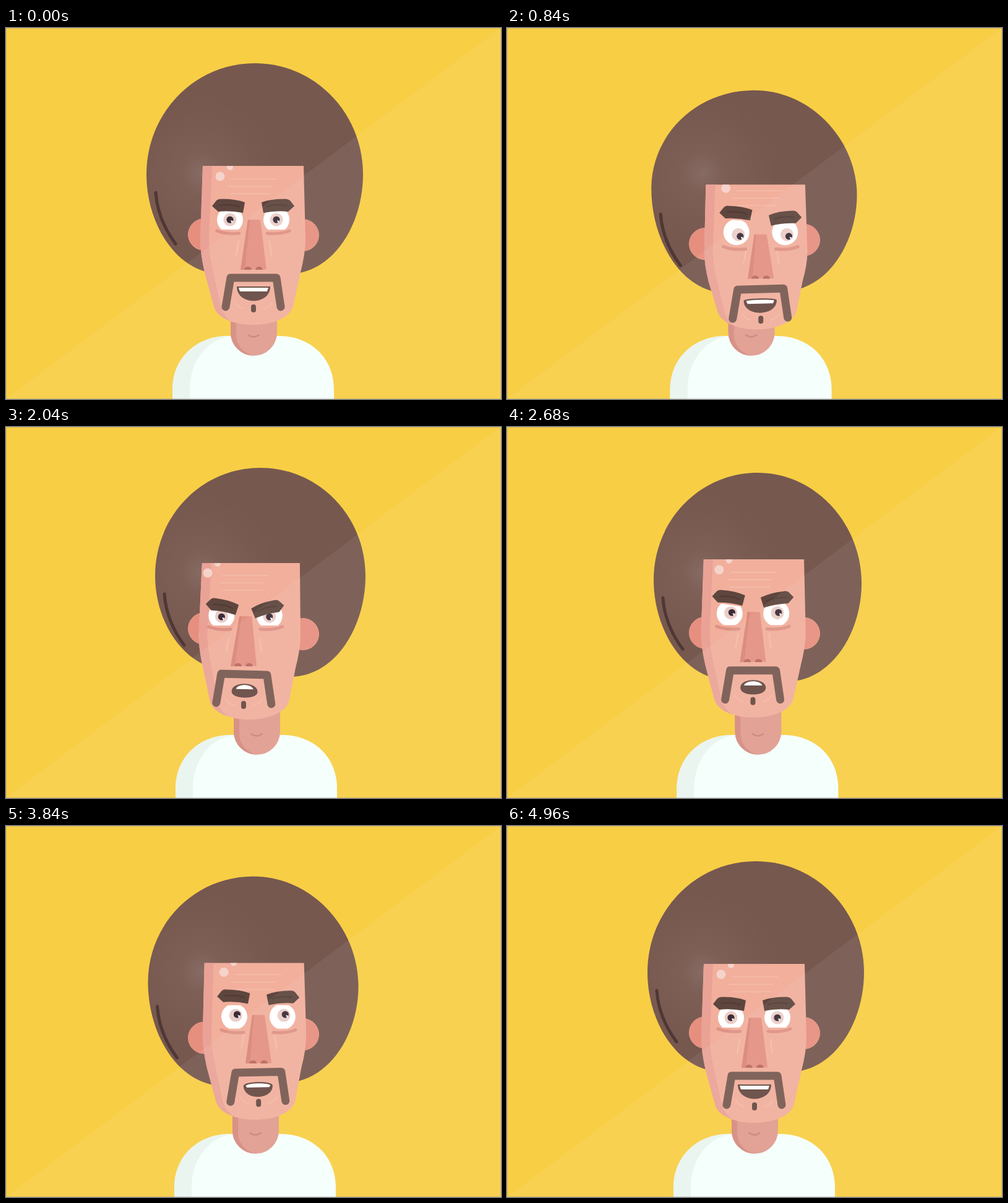
Recreate the animation shown at these times as an HTML page. Size 800 px wide and 600 px high, loop 5000 ms.

```html
<!DOCTYPE html>
<html lang="en">
<head>
<meta charset="utf-8">
<title>Talking head</title>
<style>
html, body { margin: 0; width: 100%; height: 100%; overflow: hidden; background: #f8ce45; }
svg { display: block; width: 100vw; height: 100vh; }
</style>
</head>
<body>
<svg viewBox="0 0 800 600" xmlns="http://www.w3.org/2000/svg">
  <defs>
    <radialGradient id="glow" gradientUnits="userSpaceOnUse" cx="316" cy="235" r="120">
      <stop offset="0" stop-color="#fff" stop-opacity=".12"/>
      <stop offset=".3" stop-color="#f0c8c0" stop-opacity=".06"/>
      <stop offset="1" stop-color="#f0c8c0" stop-opacity="0"/>
    </radialGradient>
  </defs>
  <rect width="800" height="600" fill="#f8ce45"/>
  <g id="man"></g>
  <path d="M0 600L800 0V600Z" fill="#fff" opacity=".06"/>
  <rect x=".5" y=".5" width="799" height="599" fill="none" stroke="#8a8a8a" opacity=".3"/>
</svg>
<script>
const LOOP = 5000;
const man = document.getElementById('man');

// d: sideways turn of the face; l*: eyelids; m*: mouth; t*: teeth; h*: hair
const front = {
  d: 0, top: 223, chin: 480, eye: 310, lt: -14, ls: 0, lb: 16, px: 0, py: 0,
  brow: 288, browR: 288, rot: 0, nose: 310, tip: 391, lip: 404, tilt: 0,
  mouth: 418, mw: 27, mu: 0, md: 31, tb: 8, th: 6, tc: 0, tw: 24,
  earL: 334, earR: 335, hx: 227, hw: 350, hTop: 57, hMid: 237, hDip: 0,
  hBot: 398, hTilt: 0, spot: 240, body: 0
};
const right = {
  ...front, d: 18, top: 260, chin: 490, eye: 335, lt: -23, lb: 23, px: 8, py: 8,
  brow: 300, browR: 309, nose: 339, tip: 409, lip: 426.5, tilt: -3, mouth: 442,
  earL: 355, earR: 344, hx: 231, hw: 330, hTop: 110, hMid: 265, hDip: 13,
  hBot: 435, hTilt: -6, spot: 264, body: -9
};
const left = {
  ...front, d: -16, top: 230, chin: 479, eye: 314, lt: -8, ls: 6, py: 2,
  brow: 298, browR: 303, rot: 8, nose: 316, tip: 394, lip: 408, tilt: 2,
  mouth: 436, mw: 25.5, mu: 19, md: 12, tb: -5, th: 0, tc: 9, tw: 18,
  earL: 329, earR: 339, hx: 241, hw: 340, hTop: 70, hMid: 242,
  hBot: 402, hTilt: 10, spot: 243, body: 7
};
const leftUp = {
  ...left, top: 220, chin: 473, eye: 305, brow: 290, browR: 294, nose: 306,
  tip: 387, lip: 400, mouth: 428, mw: 21, mu: 17, md: 13, tb: -4, tw: 14,
  earL: 326, earR: 335, hTop: 66, hMid: 241, hBot: 399, spot: 236, body: 5
};
const rightUp = {
  ...right, top: 205, chin: 465, eye: 296.5, px: 9, py: -7, brow: 255, browR: 255,
  nose: 289, tip: 370, lip: 384.5, mouth: 412, mw: 20, mu: 16, md: 17,
  tb: -3, th: 0, tc: 9, tw: 16, earL: 343, earR: 332,
  hTop: 86, hMid: 257, hBot: 428, hTilt: -9, spot: 223, body: 6
};
const nod = {
  ...front, d: -1.5, top: 238, chin: 485, eye: 320, brow: 297, browR: 301, rot: 2,
  nose: 322, tip: 398, lip: 412, mouth: 428, earL: 342, earR: 342,
  hx: 228, hTop: 77, hMid: 249, hBot: 408, spot: 250
};

// each move: start, end, pose reached
const moves = [
  [40, 560, right], [680, 1200, left], [1280, 2000, leftUp],
  [2440, 3000, rightUp], [3520, 4160, nod], [4240, 4720, front]
];

const ease = k => k * k * (3 - 2 * k);

function poseAt(t) {
  let from = front;
  for (const [a, b, to] of moves) {
    if (t <= a) return from;
    if (t < b) {
      const k = ease((t - a) / (b - a)), mix = {};
      for (const n in to) mix[n] = from[n] + (to[n] - from[n]) * k;
      return mix;
    }
    from = to;
  }
  return from;
}

const fill = (d, c, more = '') => `<path d="${d}" fill="${c}" ${more}/>`;
const line = (d, c, w, more = '') =>
  `<path d="${d}" fill="none" stroke="${c}" stroke-width="${w}" stroke-linecap="round" stroke-linejoin="round" ${more}/>`;
const dot = (x, y, r, c, more = '') => `<circle cx="${x}" cy="${y}" r="${r}" fill="${c}" ${more}/>`;
const clip = (id, d) => `<clipPath id="${id}"><path d="${d}"/></clipPath>`;

function hair(p) {
  const l = p.hx, r = l + p.hw, c = (l + r) / 2, k = p.hw * .28;
  const ml = p.hMid, mr = ml + p.hDip, v = (ml - p.hTop) * .55;
  const bl = p.hBot - p.hTilt / 2, br = p.hBot + p.hTilt / 2;
  const d = `M${c} ${p.hTop}C${c + k} ${p.hTop} ${r} ${mr - v} ${r} ${mr}
    C${r} ${mr + (br - mr) * .49} ${r - 47} ${br} ${r - 122} ${br}L${l + 123} ${bl}
    C${l + 48} ${bl} ${l} ${ml + (bl - ml) * .49} ${l} ${ml}
    C${l} ${ml - v} ${c - k} ${p.hTop} ${c} ${p.hTop}Z`;
  const y = ml + 29 + Math.max(0, p.d) * 1.2;
  return fill(d, '#76584f') + fill(d, 'url(#glow)') +
    line(`M${l + 15} ${y}q3 44 32 83`, '#4f3735', 5);
}

function body(p) {
  const shirt = 'M269 601V585C269 535 306 498 360 498H440C494 498 530 535 530 585V601Z';
  const neck = 'M363 420H438V492.500A37.500 37.500 0 0 1 363 492.500Z';
  return `<g transform="translate(${p.body})">` +
    fill(shirt, '#f4fffb') +
    fill('M269 601V585C269 535 306 498 360 498C322 506 297 542 297 585V601Z', '#e9f4ef') +
    fill(neck, '#e09c8f') +
    fill('M363 420H372V495C372 512 382 525 400 530A37.500 37.500 0 0 1 363 492.500Z', '#d58b81') +
    line('M391.500 496.500q8.500 6 17 0', '#ca847a', 2.5) + '</g>';
}

function eye(p, x, side) {
  const id = side > 0 ? 'lidL' : 'lidR', s = p.ls * side;
  const ix = p.px * .5, iy = p.py * .6;
  return `<g transform="translate(${x} ${p.eye})">` +
    clip(id, `M-24 ${p.lt - s}L24 ${p.lt + s}V${p.lb - 4}Q20 ${p.lb} 14 ${p.lb}H-14Q-20 ${p.lb} -24 ${p.lb - 4}Z`) +
    line(`M${-21 * side} ${p.lb + 2}q${15 * side} 6 ${36 * side} 4`, '#de9185', 5) +
    `<g clip-path="url(#${id})">` + dot(0, 0, 21, '#fff') +
    dot(ix, iy, 10.5, '#ebcdc8') + dot(p.px, p.py, 5.6, '#3b2d36') +
    fill(`M${p.px + 1} ${p.py + 1}l4 1l-2 4Z`, '#fff') + '</g></g>';
}

function brow(x, y, rot, side) {
  return `<g transform="translate(${x} ${y}) rotate(${rot}) scale(${side} 1)">` +
    fill('M-27 0L-20 -9Q-17 -12 -12 -11.500Q10 -12 26 -6L23 11Q3 7 -17 9Z', '#5e463e') +
    line('M-14 -1Q4 -4 17 1', '#503a34', 2) + '</g>';
}

function mouth(p) {
  const { mw: w, mu: u, md: m, tw, tb, th, tc } = p, y = tb - th;
  return `<g transform="translate(${400 + p.d * .9} ${p.mouth}) rotate(${p.tilt * .7})">` +
    fill(`M${-w} 0C${-w} ${-u} ${w} ${-u} ${w} 0C${w} ${m} ${-w} ${m} ${-w} 0Z`, '#674a43') +
    fill(`M${-tw} ${y}C${-tw * .8} ${y - tc} ${tw * .8} ${y - tc} ${tw} ${y}L${tw - 2} ${tb}H${2 - tw}Z`, '#fff') + '</g>';
}

function head(p) {
  const d = p.d, pick = (a, b) => d * (d > 0 ? a : b);
  const x0 = 318 + pick(.33, .07), x1 = 481 + pick(.08, .38);
  const lx = 314 + pick(.47, .16), rx = 484 + pick(.15, .5);
  const jl = 336 + d * .4, jr = 464 + d * .4, jaw = p.chin - 30, c = 399 + d * .4;
  const h = p.chin - p.top, y1 = p.top + h * .46, y2 = p.top + h * .55, y3 = p.top + h * .67;
  const face = `M${x0} ${p.top}H${x1}L${rx} ${y1}Q${rx} ${y2} ${rx - 8} ${y3}L${jr} ${jaw}
    C${jr - 6} ${jaw + 20} ${jr - 34} ${p.chin} ${c} ${p.chin}
    C${jl + 34} ${p.chin} ${jl + 5} ${jaw + 20} ${jl} ${jaw}
    L${lx + 7} ${y3}Q${lx} ${y2} ${lx} ${y1}Z`;
  const shade = `M${x0 - 9} ${p.top}H${x0 + 15}L${lx + 14} ${y1}Q${lx + 14} ${y2} ${lx + 21} ${y3}
    L${jl + 11} ${jaw}Q${jl + 16} ${jaw + 18} ${jl + 36} ${p.chin}H${lx - 9}Z`;
  const sx = 346 + pick(.75, 1.25), wx = 400 + d * .8, w = p.spot + 4;
  const nx = 400 + d, nt = 401 + d * .85;
  const mx = 400 + d * .95, a = p.lip - p.tilt / 2, b = p.lip + p.tilt / 2;

  return fill(face, '#f1af9c') + clip('face', face) + '<g clip-path="url(#face)">' +
    fill(shade, '#eaa296') +
    dot(sx, p.spot, 7.5, '#f5d3cb') + dot(sx + 16, p.spot - 15, 5, '#f5d3cb') +
    line(`M${wx - 37} ${w}h75M${wx - 42} ${w + 12}h72M${wx - 37} ${w + 24}h64`, '#f6bdac', 1.6) +
    '</g>' +
    line(`M${nx - 24} ${p.tip - 46}l-4 22M${nx + 26} ${p.tip - 46}l3 22`, '#f6bcaa', 2) +
    eye(p, 362 + d * .85, 1) + eye(p, 437 + pick(1.2, .7), -1) +
    brow(360 + pick(1, .65), p.brow, p.rot, 1) +
    brow(439 + d, p.browR, -p.rot * 1.5, -1) +
    fill(`M${nt - 10} ${p.nose}H${nt + 10}L${nx + 21} ${p.tip - .5}H${nx - 21}Z`, '#e39283') +
    fill(`M${nt - 10} ${p.nose}h3L${nx - 14} ${p.tip}h-7Z`, '#d98778') +
    fill(`M${nx - 15} ${p.tip}q1 -5 6 -5t6 5ZM${nx + 3} ${p.tip}q1 -5 6 -5t6 5Z`, '#b9695f') +
    line(`M${mx - 30} ${p.lip + 39}q6 10 14 11M${mx + 16} ${p.lip + 50}q9 -2 14 -10`, '#f5baa8', 1.6) +
    line(`M${mx - 45} ${a + 47}L${mx - 37} ${a}L${mx + 37} ${b}L${mx + 44} ${b + 47}`, '#785a51', 13) +
    mouth(p) +
    line(`M${nx} ${p.lip + 47}v5`, '#674a43', 8);
}

function ear(x, y) {
  return dot(x, y, 25.5, '#e68f7f', 'stroke="#ea9c8b" stroke-width="1"');
}

function draw(t) {
  const p = poseAt(t);
  const swish = t >= 560 && t < 660 ? fill('M523 391Q541 395 548 414Q538 399 524 396Z', '#fdf3cf') : '';
  man.innerHTML = swish + hair(p) + ear(320, p.earL) + ear(480, p.earR) + body(p) + head(p);
}

function tick() {
  draw(performance.now() % LOOP);
  requestAnimationFrame(tick);
}
tick();
</script>
</body>
</html>
```
